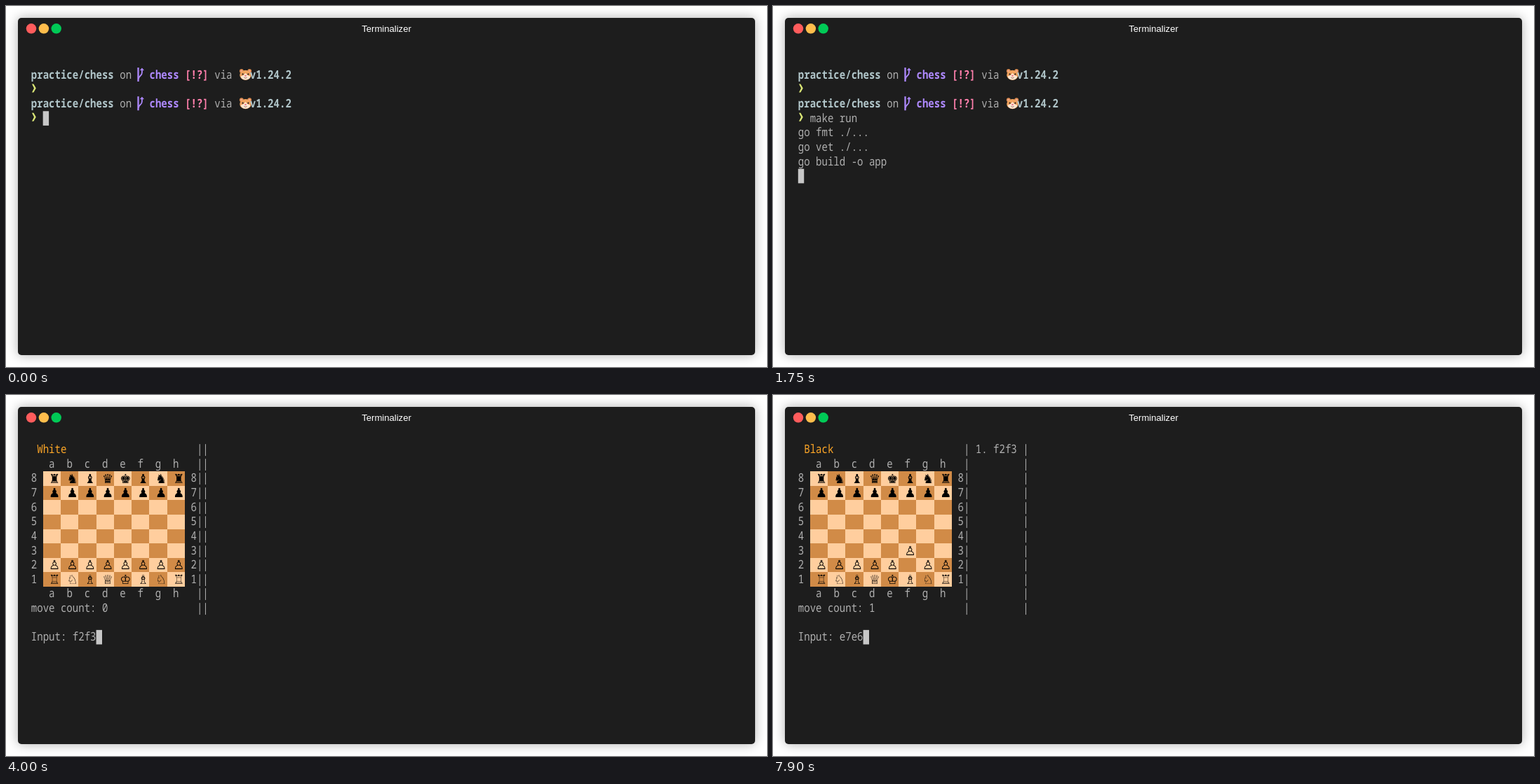
Animation of 1085 by 516 pixels, one loop 8 s. Source, as an HTML page:

```html
<!DOCTYPE html>
<html lang="en">
<head>
<meta charset="utf-8">
<title>Terminal chess</title>
<style>
  html, body { margin: 0; width: 100%; height: 100%; overflow: hidden; background: #fff; }
  .window {
    position: absolute; left: 17px; top: 17px; width: 1051px; height: 482px;
    border-radius: 5px; background: #1d1d1d; box-shadow: 0 0 16px rgba(0, 0, 0, .32);
  }
  svg { position: absolute; left: 0; top: 0; }
  .title { font: 13.1px "Liberation Sans", Arial, sans-serif; fill: #fff; text-anchor: middle; }
  #screen text {
    font: 14.055px "Noto Sans Mono", "DejaVu Sans Mono", monospace;
    white-space: pre; text-rendering: geometricPrecision;
  }
  #screen .bold { font-weight: 700; }
  #screen .piece { font: 18px "DejaVu Sans", sans-serif; }
</style>
</head>
<body>
<div class="window"></div>
<svg width="1085" height="516" viewBox="0 0 1085 516">
  <defs>
    <g id="branch" fill="none" stroke="#ae89fe" stroke-width="2.3">
      <path d="M188.5 88V108"/>
      <path d="M193.9 90V95Q193.9 98 191.6 99.8T188.8 104.5" stroke-width="1.8"/>
      <path d="M191.6 92 193.9 89.4 196.2 92" stroke-width="1.3"/>
    </g>
    <g id="hamster">
      <g fill="#d98a4e"><circle cx="335.8" cy="93" r="2.9"/><circle cx="347.2" cy="93" r="2.9"/></g>
      <g fill="#f5aa92"><circle cx="335.8" cy="93" r="1.4"/><circle cx="347.2" cy="93" r="1.4"/></g>
      <ellipse cx="341.5" cy="98.8" rx="8.3" ry="7.1" fill="#f2a45f"/>
      <path d="M341.5 95.5Q343 99 348.5 100.5Q347 105.5 341.5 105.5T334.5 100.5Q340 99 341.5 95.5Z" fill="#fbe6d2"/>
      <g fill="#3b2a25"><circle cx="337.6" cy="97.4" r="1.2"/><circle cx="345.4" cy="97.4" r="1.2"/></g>
      <ellipse cx="341.5" cy="99.8" rx="1.4" ry="1" fill="#e8677c"/>
      <path d="M339.5 102.3Q341.5 104 343.5 102.3" fill="none" stroke="#7a4a3c" stroke-width=".8"/>
    </g>
    <path id="chevron" d="M37 111.6H39.4L42.8 117.6 39.4 123.6H37L40 117.6Z" fill="#d9e576"/>
  </defs>
  <circle cx="36" cy="32.3" r="7.2" fill="#ff5c5c"/>
  <circle cx="53.9" cy="32.3" r="7.2" fill="#ffbd4c"/>
  <circle cx="71.7" cy="32.3" r="7.2" fill="#00ca56"/>
  <text class="title" x="542.5" y="37.2">Terminalizer</text>
  <g id="screen"></g>
</svg>
<script>
const LOOP = 8000, CW = 8.433, CH = 20.62, X0 = 35.8, Y0 = 67.8;
const TALL = 1.2; // height of the tall terminal face
const GREY = '#afafaf', CYAN = '#b1c6ca', PURPLE = '#ae89fe', PINK = '#ff7fac', ORANGE = '#ffa727';
const COMMAND = [690, 780, 870, 960, 1060, 1140, 1210, 1390];
const OUTPUT = [1570, 1600, 1750];
const GAME = 1880, MOVED = 4950;
const WHITE_KEYS = [2880, 3580, 3900, 4000];
const BLACK_KEYS = [5950, 6240, 7240, 7900];
const STEPS = [...COMMAND, ...OUTPUT, GAME, ...WHITE_KEYS, MOVED, ...BLACK_KEYS];

const screen = document.getElementById('screen');
const colX = col => X0 + col * CW;
const rowY = row => Y0 + row * CH;
const passed = (times, t) => times.filter(at => t >= at).length;

const text = (col, row, str, fill = GREY, cls = '') =>
  `<text transform="translate(${colX(col)} ${rowY(row) + 15.4}) scale(1 ${TALL})" fill="${fill}" class="${cls}">${str}</text>`;
const chessman = (col, row, str) =>
  `<text x="${colX(col)}" y="${rowY(row) + 16.6}" class="piece">${str}</text>`;
const rect = (col, row, w, fill, edges = 'auto') =>
  `<rect x="${colX(col)}" y="${rowY(row)}" width="${w * CW}" height="${CH}" fill="${fill}" shape-rendering="${edges}"/>`;
const cursor = (col, row) => rect(col, row, 1, '#c7c7c7');

function prompt(row) {
  const shift = (row - 1) * CH;
  return text(0, row, 'practice/chess', CYAN, 'bold') + text(15, row, 'on') +
    text(20, row, 'chess', PURPLE, 'bold') + text(26, row, '[!?]', PINK, 'bold') +
    text(31, row, 'via') +
    ['branch', 'hamster', 'chevron'].map(id => `<use href="#${id}" y="${shift}"/>`).join('') +
    text(37, row, 'v1.24.2', CYAN, 'bold');
}

function shell(t) {
  const typed = 'make run'.slice(0, passed(COMMAND, t));
  const lines = ['go fmt ./...', 'go vet ./...', 'go build -o app'].slice(0, passed(OUTPUT, t));
  return prompt(1) + prompt(3) + text(2, 4, typed) +
    lines.map((line, i) => text(0, 5 + i, line)).join('') +
    (lines.length ? cursor(0, 5 + lines.length) : cursor(2 + typed.length, 4));
}

function game(t) {
  const moved = t >= MOVED;
  const empty = ' '.repeat(8);
  const ranks = ['♜♞♝♛♚♝♞♜', '♟'.repeat(8), empty, empty, empty,
    moved ? '     ♙  ' : empty, moved ? '♙♙♙♙♙ ♙♙' : '♙'.repeat(8), '♖♘♗♕♔♗♘♖'];
  const files = 'a  b  c  d  e  f  g  h';
  const input = moved ? 'e7e6'.slice(0, passed(BLACK_KEYS, t)) : 'f2f3'.slice(0, passed(WHITE_KEYS, t));

  let out = text(1, 0, moved ? 'Black' : 'White', ORANGE) + text(3, 1, files) + text(3, 10, files);
  ranks.forEach((rank, r) => {
    const row = r + 2;
    out += text(0, row, 8 - r) + text(27, row, 8 - r);
    [...rank].forEach((piece, f) => {
      out += rect(2 + f * 3, row, 3, (f + r) % 2 ? '#d18b47' : '#ffce9e', 'crispEdges');
      if (piece !== ' ') out += chessman(3 + f * 3, row, piece);
    });
  });
  for (let row = 0; row < 12; row++) out += text(28, row, '|') + text(moved ? 38 : 29, row, '|');
  if (moved) out += text(30, 0, '1. f2f3');
  return out + text(0, 11, 'move count: ' + (moved ? 1 : 0)) +
    text(0, 13, 'Input: ' + input) + cursor(7 + input.length, 13);
}

let shown = -1;
function draw() {
  const t = performance.now() % LOOP;
  const step = passed(STEPS, t);
  if (step !== shown) {
    shown = step;
    screen.innerHTML = t < GAME ? shell(t) : game(t);
  }
  requestAnimationFrame(draw);
}
draw();
</script>
</body>
</html>
```
